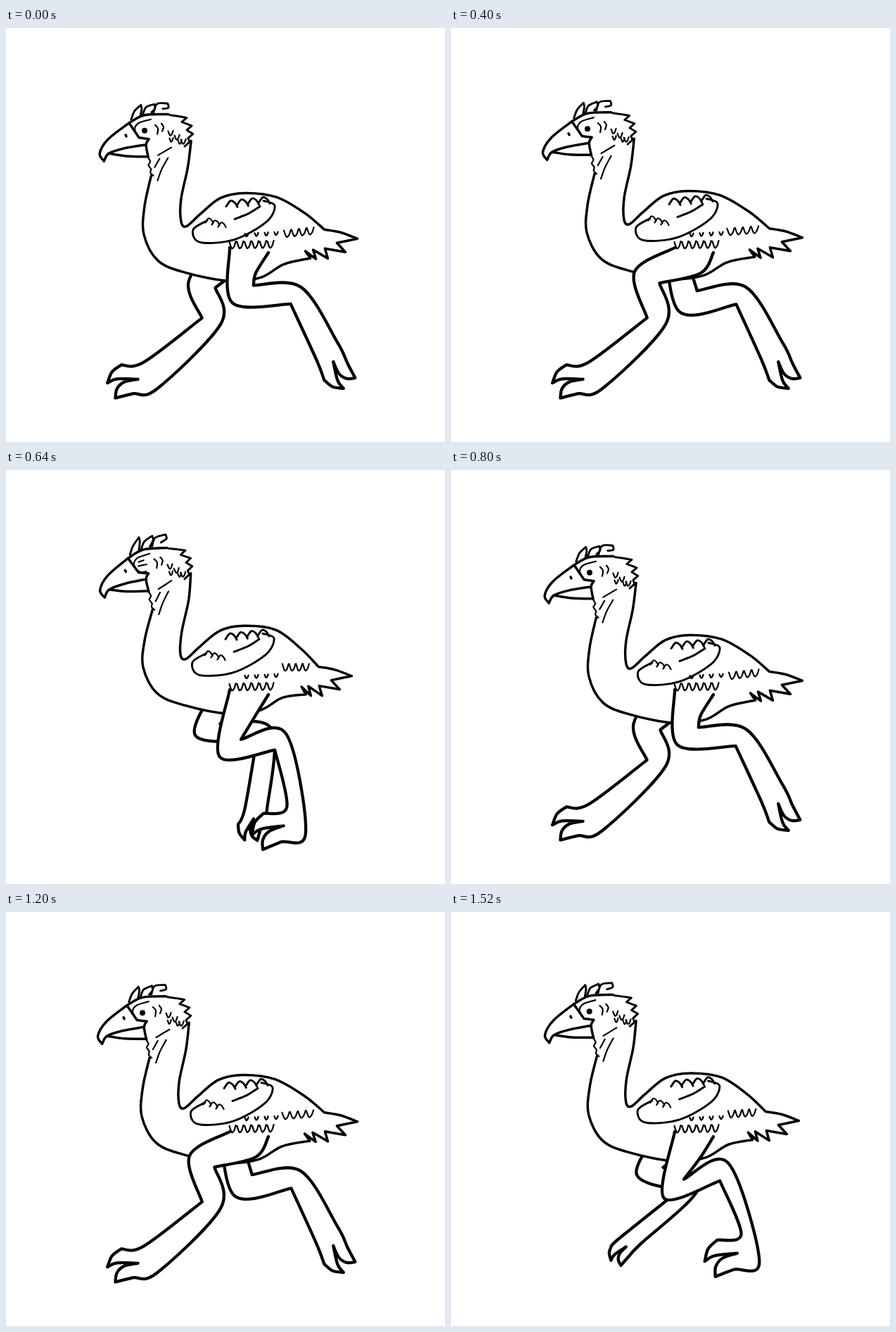
Write an HTML page that moves like this. It is 624 px wide and 588 px high and loops after 1.6 s.

```html
<!DOCTYPE html>
<html lang="en">
<head>
<meta charset="utf-8">
<title>Running bird</title>
<style>
html, body { margin: 0; width: 100%; height: 100%; overflow: hidden; background: #fff; }
svg { display: block; width: 624px; height: 588px; }
path { fill: none; stroke: #000; stroke-linecap: round; stroke-linejoin: round; }
.solid { fill: #fff; }
</style>
</head>
<body>
<svg viewBox="0 0 624 588">
  <path id="far" class="solid" stroke-width="4.3"/>
  <path id="body" class="solid" stroke-width="3.5"/>
  <path id="near" class="solid" stroke-width="4.3"/>
  <path id="wing" stroke-width="2.9"/>
  <path id="marks" stroke-width="2.2"/>
  <path id="skirt" stroke-width="2.3"/>
  <path id="crest" stroke-width="2.9"/>
  <path id="beak" stroke-width="3.5"/>
  <ellipse id="pupil"/>
</svg>
<script>
const STEP = 80, STEPS = 20, CYCLE = 10, SHUT_STEP = 8;
const EYE = [198, 147];

// Curves are point lists: "|" marks a sharp corner, ";" lifts the pen.
const BODY =
  "264,162 259,200 249,245 249,277 257,283 276,266 305,243 340,236 385,242 425,264 453,287|476,291 500,300|" +
  "471,306|483,319|454,314|458,328|437,316|441,329|426,318|433,328|" +
  "395,337 362,356 317,361 255,349 216,332 196,295 197,255 207,211";
const WING = "286,275 266,288 276,306 325,302 370,277 382,254 366,247;325,273 345,265 361,255";
const FACE =
  "213,139 217,144 216,152;222,137 225,142 223,148;217,182 236,171;" +
  "219,187 212,199;231,186 222,202 216,218;203,185 206,191|203,196|207,202|206,207 210,211";
const BEAK =
  "176,136 146,159 134,179 140,190|147,179 169,172 200,167;147,179 172,183 203,184;" +
  "176,136 190,157|204,159|200,167 203,185;171,153 172,155;176,136 198,125 232,124";
const LID = "187,153 184,144 190,136 207,131";
const SHUT = ";187,153 194,157 201,156;191,142 198,140;190,148 202,146";

// One stride of a leg: phase, knee, ankle, foot, foot angle, foot length.
const STRIDE = [
  [0, 338, 377, 412, 380, 452, 455, 53, 62],
  [1, 322, 393, 394, 375, 427, 463, 77, 57],
  [3, 288, 358, 367, 377, 355, 477, 97, 50],
  [4, 284, 357, 338, 394, 258, 462, 122, 44],
  [5, 280, 355, 292, 416, 211, 490, 157, 67],
  [6, 287, 358, 347, 399, 262, 493, 162, 64],
  [8, 320, 394, 390, 386, 418, 492, 148, 72],
  [9, 318, 392, 388, 369, 431, 472, 150, 73]
];

// Two clawed toes, pointing along x, for a foot 67 long.
const FOOT = "8,20 39,29|55,25 67,13|52,13 25,1|45,5 58,0 65,-11|40,-15 5,-22";

const clamp = v => Math.max(0, Math.min(1, v));
const mix = (a, b, k) => a + (b - a) * k;
const wave = (i, period) => Math.cos(2 * Math.PI * i / period);
const sum = (p, q, k = 1) => [p[0] + q[0] * k, p[1] + q[1] * k];
const unit = ([x, y]) => [x / Math.hypot(x, y), y / Math.hypot(x, y)];
const range = n => [...Array(n).keys()];

const parse = text => text.split(";").map(line =>
  line.split("|").map(part => part.split(" ").map(p => p.split(",").map(Number))));

function smooth(pts) {
  let d = "";
  for (let i = 0; i < pts.length - 1; i++) {
    const p = pts[i], q = pts[i + 1], o = pts[i - 1] || p, r = pts[i + 2] || q;
    const a = sum(p, sum(q, o, -1), 1 / 6), b = sum(q, sum(r, p, -1), -1 / 6);
    d += "C" + [...a, ...b, ...q].map(v => v.toFixed(1)).join(" ");
  }
  return d;
}

function trace(lines, move = p => p) {
  return lines.map(parts => {
    let last = null, d = "";
    for (const part of parts) {
      const pts = part.map(move);
      if (last) pts.unshift(last);
      else d = "M" + pts[0].join(" ");
      d += smooth(pts);
      last = pts[pts.length - 1];
    }
    return d;
  }).join("");
}

// A row of small curved feathers from a to b; a negative height arches them.
const row = (a, b, n, w, h) => range(n).map(i => {
  const x = mix(a[0], b[0], i / (n - 1)), y = mix(a[1], b[1], i / (n - 1));
  return [[[x - w / 2, y], [x - w / 8, y + h], [x + w / 4, y + h * 0.7], [x + w / 2, y - h * 0.1]]];
});

const wingLines = [...parse(WING), ...row([321, 255], [367, 250], 4, 16, -8)];
const markLines = [
  ...parse(FACE),
  ...row([235, 148], [253, 160], 3, 7, 6), ...row([236, 158], [248, 161], 2, 5, 5),
  ...row([289, 278], [307, 284], 3, 11, -6),
  ...row([400, 289], [433, 285], 4, 10, 9)
];
const skirtLines = [
  ...row([322, 304], [376, 303], 6, 9, 9),
  ...row([342, 292], [384, 290], 4, 5, 4)
];

function crestLines(lift) {
  const leaves = range(3).map(i => {
    const x = 179 + 16 * i, y = 131 - 5 * i, tip = [x + 14 + 3 * i, y - 20 + 4 * i - 4 * lift];
    return [[[x, y], [x + 5, y - 12], tip], [[tip[0] + 1, tip[1] + 6], [x + 13, y - 5]]];
  });
  const nape = [[[234, 125], [247, 127]]];
  for (const i of range(4)) {
    const x = 258 + 9 * Math.sin(0.9 * i), y = 129 + 11.5 * i;
    nape.push([[x, y]], [[x - 7, y + 6]]);
  }
  return [...leaves, nape];
}

// The whole trunk follows one bob, twice per stride; head and tail trail it.
function sway(i) {
  const rise = wave(i - 2.6, 5), side = wave(i, CYCLE);
  const bob = -9.5 - 6.5 * rise * 1 + 1.5 * side;
  return {
    head: [-2.5 + 1.5 * side, bob * 0.8],
    tilt: bob * 0.2 * Math.PI / 180,
    trunk: [-1.5 + 1.5 * side, bob],
    tail: [-9 * Math.sqrt((1 + rise) / 2), bob * 0.5],
    lift: clamp(-bob / 15)
  };
}

const bend = ({ head, tilt, trunk, tail }) => p => {
  const c = Math.cos(tilt), s = Math.sin(tilt);
  const nod = p[0] < 270 ? clamp((272 - p[1]) / 62) : 0;
  const wag = clamp((p[0] - 385) / 65);
  const [x, y] = sum(p, EYE, -1);
  const turned = sum(sum(EYE, head), [x * c - y * s, x * s + y * c]);
  const carried = [0, 1].map(k => p[k] + mix(trunk[k], tail[k], wag));
  return [0, 1].map(k => mix(carried[k], turned[k], nod));
};

function strideAt(phase) {
  const next = STRIDE.find(k => k[0] >= phase);
  const prev = STRIDE.filter(k => k[0] <= phase).pop();
  const k = next === prev ? 0 : (phase - prev[0]) / (next[0] - prev[0]);
  return prev.map((v, j) => mix(v, next[j], k));
}

// Points on the inside and outside of a bent joint.
function joint(a, p, b, inner, outer) {
  const way = unit(sum(unit(sum(a, p, -1)), unit(sum(b, p, -1))));
  return [sum(p, way, inner), sum(p, way, -outer)];
}

function leg(phase, shift) {
  const [, kx, ky, ax, ay, fx, fy, angle, size] = strideAt(phase);
  const hip = sum([347, 315], [-shift, -shift]), knee = [kx, ky + shift * 0.7];
  const ankle = [ax, ay], foot = [fx, fy];
  const [crook, cap] = joint(hip, knee, ankle, 18, 21);
  const [front, heel] = joint(knee, ankle, foot, 14, 14);
  const a = angle * Math.PI / 180, c = Math.cos(a), s = Math.sin(a), k = size / 67;
  const toes = parse(FOOT)[0].map(part =>
    part.map(([u, v]) => [fx + k * (u * c - v * s), fy + k * (u * s + v * c)]));
  const first = toes[0], last = toes[toes.length - 1];
  return [[
    [sum(hip, [-29, -3]), cap, front],
    first,
    ...toes.slice(1, -1),
    [...last, heel, crook],
    [sum(hip, [8, 33]), sum(hip, [26, 4])]
  ]];
}

function draw(step) {
  const i = step % CYCLE, pose = sway(i), move = bend(pose);
  const open = 4 * clamp(Math.abs(step - SHUT_STEP) / 2);
  const put = (id, lines, fn) => document.getElementById(id).setAttribute("d", trace(lines, fn));
  put("far", leg((i + CYCLE / 2) % CYCLE, 14));
  put("near", leg(i, 0));
  put("body", parse(BODY), move);
  put("wing", wingLines, move);
  put("marks", [...markLines, ...parse(LID + (open ? "" : SHUT))], move);
  put("skirt", skirtLines);
  put("crest", crestLines(pose.lift), move);
  put("beak", parse(BEAK), move);
  const [cx, cy] = move(EYE);
  const pupil = { cx, cy, rx: open ? 4 : 0, ry: open };
  for (const k in pupil) document.getElementById("pupil").setAttribute(k, pupil[k]);
}

let shown = -1;
function tick() {
  const step = Math.floor(performance.now() / STEP) % STEPS;
  if (step !== shown) draw(shown = step);
  requestAnimationFrame(tick);
}
tick();
</script>
</body>
</html>
```
